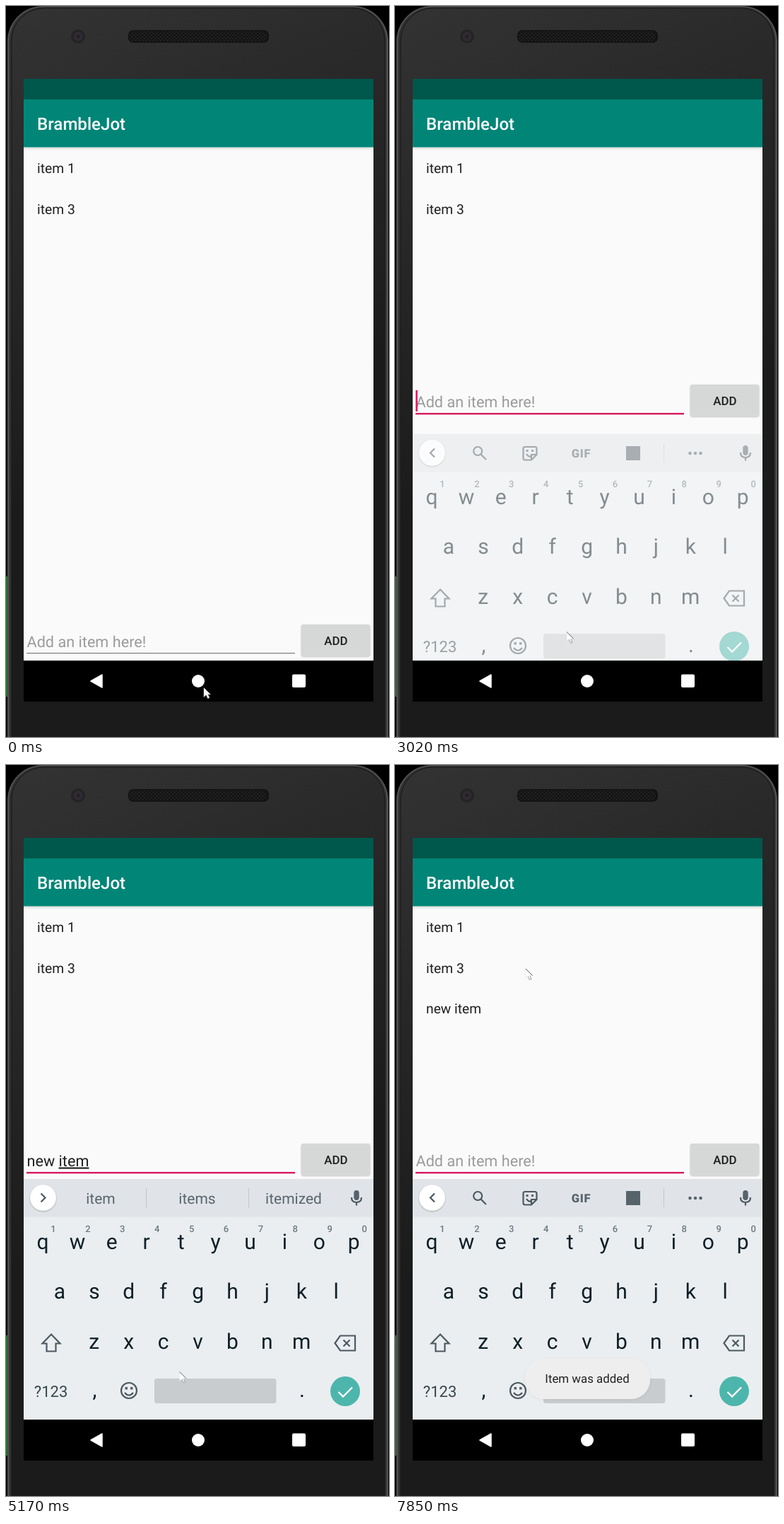
An HTML page that plays this animation: 542x1033 px, repeating every 8 s.

```html
<!DOCTYPE html>
<html lang="en">
<head>
<meta charset="utf-8">
<title>Todo list</title>
<style>
  html, body { margin: 0; width: 100%; height: 100%; overflow: hidden; background: #000; }
  svg { display: block; width: 542px; height: 1033px; font-family: Roboto, "Noto Sans", sans-serif; }
  text { white-space: pre; text-rendering: geometricPrecision; }
  .mid { text-anchor: middle; }
  .medium { font-weight: 500; }
  .item { font-size: 19.27px; fill: #1f1f1f; }
  .entry { font-size: 21.67px; }
  .key { font-size: 30px; fill: #0e1f27; }
  .digit { font-size: 13px; font-weight: 500; fill: #6d7980; }
  .word { font-size: 21px; fill: #5a666d; }
  .line { fill: none; stroke: #4c5960; stroke-width: 2.2; }
  .solid { fill: #57636a; }
  .composing { text-decoration: underline; text-decoration-thickness: 1px; }

  #pointer { animation: point 8s linear infinite; }
  #keyboard { animation: rise 8s linear infinite; }
  #toast { animation: toast 8s linear infinite; }

  @keyframes point {
    0%, 10.875% { transform: translate(280px, 963px); }
    11.875%, 14.5% { transform: translate(274px, 965px); }
    17.625% { transform: translate(243px, 905px); }
    20.75%, 64.25% { transform: translate(243px, 884.5px); }
    64.625% { transform: translate(245px, 858px); }
    67.5% { transform: translate(350px, 700px); }
    70.5% { transform: translate(477px, 585px); }
    73.375%, 84.125% { transform: translate(441px, 566px); }
    90.25%, 92.25% { transform: translate(253px, 292px); }
    98.125%, 100% { transform: translate(185px, 288px); }
  }
  @keyframes rise {
    0% { opacity: 0; transform: translateY(40px); animation-timing-function: step-end; }
    36.125% { opacity: 0; transform: translateY(40px); animation-timing-function: steps(4, jump-start); }
    40.45%, 100% { opacity: 1; transform: none; }
  }
  @keyframes toast {
    0%, 79.25% { opacity: 0; }
    81.25%, 100% { opacity: 1; }
  }
</style>
</head>
<body>
<svg viewBox="0 0 542 1033">
  <defs>
    <linearGradient id="shell" gradientUnits="userSpaceOnUse" x1="0" y1="0" x2="260" y2="620">
      <stop offset="0" stop-color="#333"/>
      <stop offset=".4" stop-color="#292929"/>
      <stop offset="1" stop-color="#1b1b1b"/>
    </linearGradient>
    <linearGradient id="drop" x2="0" y2="1">
      <stop offset="0" stop-color="#000" stop-opacity=".14"/>
      <stop offset="1" stop-color="#000" stop-opacity="0"/>
    </linearGradient>
    <pattern id="mesh" width="5" height="5" patternUnits="userSpaceOnUse">
      <circle cx="1.2" cy="1.2" r="1" fill="#282828"/>
      <circle cx="3.7" cy="3.7" r="1" fill="#282828"/>
    </pattern>
    <filter id="soft" x="-20%" y="-20%" width="140%" height="150%">
      <feDropShadow dx="0" dy="1" stdDeviation="1.2" flood-opacity=".3"/>
    </filter>
    <filter id="faint" x="-20%" y="-20%" width="140%" height="150%">
      <feDropShadow dx="0" dy="1" stdDeviation="2" flood-opacity=".06"/>
    </filter>
  </defs>

  <!-- phone -->
  <rect width="542" height="1033" fill="#000"/>
  <rect y="806" width="2" height="170" fill="#2a6a30"/>
  <rect x="2" width="539" height="1100" rx="50" fill="#505050"/>
  <rect x="4.500" y="1.500" width="534" height="1100" rx="48" fill="#303030"/>
  <rect x="8" y="3" width="528" height="1100" rx="46" fill="url(#shell)" stroke="#161616"/>
  <circle cx="102" cy="43" r="10" fill="#242424"/>
  <circle cx="102" cy="43" r="6.500" fill="#302b32"/>
  <circle cx="102" cy="43" r="2.500" fill="#242027"/>
  <rect x="173" y="34" width="199" height="18" rx="7" fill="#141414"/>
  <rect x="175" y="36" width="194" height="14" rx="6" fill="url(#mesh)"/>

  <!-- app -->
  <rect x="25" y="103" width="495" height="880" fill="#fafafa"/>
  <rect x="25" y="199" width="495" height="5" fill="url(#drop)"/>
  <rect x="25" y="103" width="495" height="29" fill="#00574b"/>
  <rect x="25" y="132" width="495" height="67.500" fill="#008577"/>
  <text class="medium" x="44" y="175" font-size="24.1" fill="#fff">BrambleJot</text>
  <text class="item" x="44" y="236">item 1</text>
  <text class="item" x="44" y="293.500">item 3</text>
  <text class="item" x="44" y="351.300" id="added">new item</text>

  <g id="form">
    <text class="entry" x="29.500" y="905.500" fill="#9b9b9b" id="hint">Add an item here!</text>
    <text class="entry" x="29.500" y="905.500" fill="#212121" id="entry"><tspan id="done"></tspan><tspan id="composing" class="composing"></tspan></text>
    <rect x="29" y="914" width="380" id="rule"/>
    <rect y="882" width="2.600" height="30" fill="#d81b60" id="caret"/>
    <rect x="418" y="874" width="97" height="44.500" rx="2.400" filter="url(#soft)" id="button"/>
    <text class="mid medium" x="466.800" y="902.500" font-size="16.86" fill="#1f1f1f">ADD</text>
  </g>

  <!-- keyboard -->
  <g id="keyboard">
    <rect x="25" y="585" width="495" height="340" fill="#eaeef0"/>
    <rect x="25" y="585" width="495" height="53.500" fill="#e0e4e8"/>
    <circle cx="52.500" cy="611.500" r="18.300" fill="#fff" filter="url(#soft)"/>
    <path class="line" id="chevron"/>

    <g id="tools">
      <path class="line" d="M121.500 613.500L129 621"/>
      <circle class="line" cx="117.200" cy="609" r="6"/>
      <path class="line" d="M184 603H198Q200.500 603 200.500 605.500V614L193 621.500H184Q181.500 621.500 181.500 619V605.500Q181.500 603 184 603ZM193 621V614H200M186 613Q189 618 193 616"/>
      <path class="solid" d="M185.500 607h3v3h-3zM193 607h3v3h-3z"/>
      <text class="mid solid" x="263.500" y="618" font-size="16.500" font-weight="900" letter-spacing=".8">GIF</text>
      <rect class="solid" x="327" y="602" width="20" height="20"/>
      <path d="M380.500 599V625" stroke="#c2c7ca"/>
      <path d="M417.500 612h.01M425 612h.01M432.500 612h.01" stroke="#57636a" stroke-width="4.600" stroke-linecap="round"/>
    </g>
    <g id="words">
      <path d="M198.500 598V626M343.500 598V626" stroke="#c2c7ca"/>
      <text class="word mid" x="134" y="620"></text>
      <text class="word mid" x="270.500" y="620"></text>
      <text class="word mid" x="407" y="620"></text>
    </g>

    <rect class="solid" x="492.300" y="601" width="7.400" height="14" rx="3.700"/>
    <path class="line" d="M489 611Q489 618 496 618T503 611M496 618V622.500"/>

    <g id="keys"></g>
    <path class="line" d="M64 804.500L76.500 817.500H70.500V828.500H57.500V817.500H51.500Z"/>
    <path class="line" d="M473 806.500H494V827.500H473L465.500 817ZM477.500 812.500L486.500 821.500M486.500 812.500L477.500 821.500"/>
    <text class="mid" x="63.500" y="892.500" font-size="22" fill="#37474f">?123</text>
    <circle class="line" cx="174" cy="884" r="11"/>
    <path class="line" d="M168 887Q174 894 180 887"/>
    <path class="solid" d="M168.500 879h3.500v3.500h-3.500zM176 879h3.500v3.500h-3.500z"/>
    <rect x="210" y="867" width="172.500" height="35" rx="3.500" fill="#c8ccce"/>
    <circle cx="480" cy="885" r="21" fill="#4db6ac"/>
    <path d="M470.500 886L477 892.500L490 879.500" fill="none" stroke="#fff" stroke-width="2.300"/>
  </g>

  <g id="toast">
    <rect x="184" y="838.500" width="177" height="57.500" rx="27" fill="#eeeeee" filter="url(#faint)"/>
    <text class="mid" x="272" y="873" font-size="16.86" fill="#222">Item was added</text>
  </g>

  <!-- navigation -->
  <rect x="25" y="925" width="495" height="58" fill="#000"/>
  <path d="M120 954L136 945V963Z" fill="#fff" stroke="#fff" stroke-width="1.500" stroke-linejoin="round"/>
  <circle cx="272" cy="954" r="9" fill="#fff"/>
  <rect x="405" y="944.500" width="19" height="18.500" rx="2" fill="#fff"/>

  <g id="pointer" fill="none" stroke-width=".8">
    <path d="M0 0V13.500L3.200 10.600L5.500 15.500L8 14.500L5.800 9.800H9.800Z" fill="#fff" stroke="#ccc" stroke-width=".4"/>
    <path d="M3.200 10.600L5.500 15.500L8 14.500L5.800 9.800" stroke="#888"/>
    <path d="M0 0L9.500 9.500" stroke="#333"/>
  </g>
</svg>

<script>
  const LOOP = 8000;
  const FOCUS = 1850, LIFT = 2550, PRESS = 6140, ADDED = 6350, RELEASE = 6730, TOOLS = 6850;
  const $ = id => document.getElementById(id);
  const words = document.querySelectorAll("#words text");

  // time, finished text, word being composed, suggestions
  const typing = [
    [3590, "", "n", "no not need"],
    [3650, "", "ne", "need new never"],
    [3730, "", "new", "new news newer"],
    [3810, "new ", "", "new news newer"],
    [3990, "new ", "i", "is in it"],
    [4070, "new ", "it", "it its it's"],
    [4180, "new ", "ite", "item items its"],
    [4290, "new ", "item", "item items itemized"],
    [ADDED, "", "", ""]
  ];
  // alternates on, off, on ...
  const blinks = [FOCUS, 2890, 2980, 3410, 3590, 4820, 5320, 5840, 6320, TOOLS, 7380, 7850];

  function addText(cls, x, y, value) {
    const el = document.createElementNS("http://www.w3.org/2000/svg", "text");
    el.setAttribute("class", cls + " mid");
    el.setAttribute("x", x);
    el.setAttribute("y", y);
    el.textContent = value;
    $("keys").append(el);
  }

  function addRow(cls, chars, x, y) {
    [...chars].forEach((c, i) => addText(cls, x + i * 48.9, y, c));
  }

  addRow("key", "qwertyuiop", 52, 683.5);
  addRow("key", "asdfghjkl", 76, 754);
  addRow("key", "zxcvbnm", 124.8, 825);
  addRow("digit", "1234567890", 67, 660);
  addText("key", 125.5, 893, ",");
  addText("key", 419, 893, ".");

  const show = (id, on) => $(id).setAttribute("visibility", on ? "visible" : "hidden");

  function draw(t) {
    const [, done, composing, list] = typing.findLast(s => t >= s[0]) || [0, "", "", ""];
    const focused = t >= FOCUS;
    const tools = t < typing[0][0] || t >= TOOLS;
    const suggestions = list.split(" ");

    $("done").textContent = done;
    $("composing").textContent = composing;
    words.forEach((el, i) => el.textContent = suggestions[i] || "");

    show("hint", !done && !composing);
    show("added", t >= ADDED);
    show("tools", tools);
    show("words", list && !tools);
    $("chevron").setAttribute("d", tools ? "M56 605.5L50 611.5L56 617.5" : "M49.500 605.5L55.500 611.5L49.500 617.5");

    $("form").setAttribute("transform", `translate(0 ${t >= LIFT ? -339 : 0})`);
    $("rule").setAttribute("height", focused ? 2.4 : 1.1);
    $("rule").setAttribute("fill", focused ? "#d81b60" : "#737373");
    $("button").setAttribute("fill", t >= PRESS && t < RELEASE ? "#cfd0d0" : "#d6d7d7");

    show("caret", blinks.filter(b => t >= b).length % 2);
    $("caret").setAttribute("x", 29.3 + (done || composing ? $("entry").getComputedTextLength() : 0));
  }

  let start;
  function tick(now) {
    start ??= now;
    draw((now - start) % LOOP);
    requestAnimationFrame(tick);
  }
  draw(0);
  requestAnimationFrame(tick);
</script>
</body>
</html>
```
